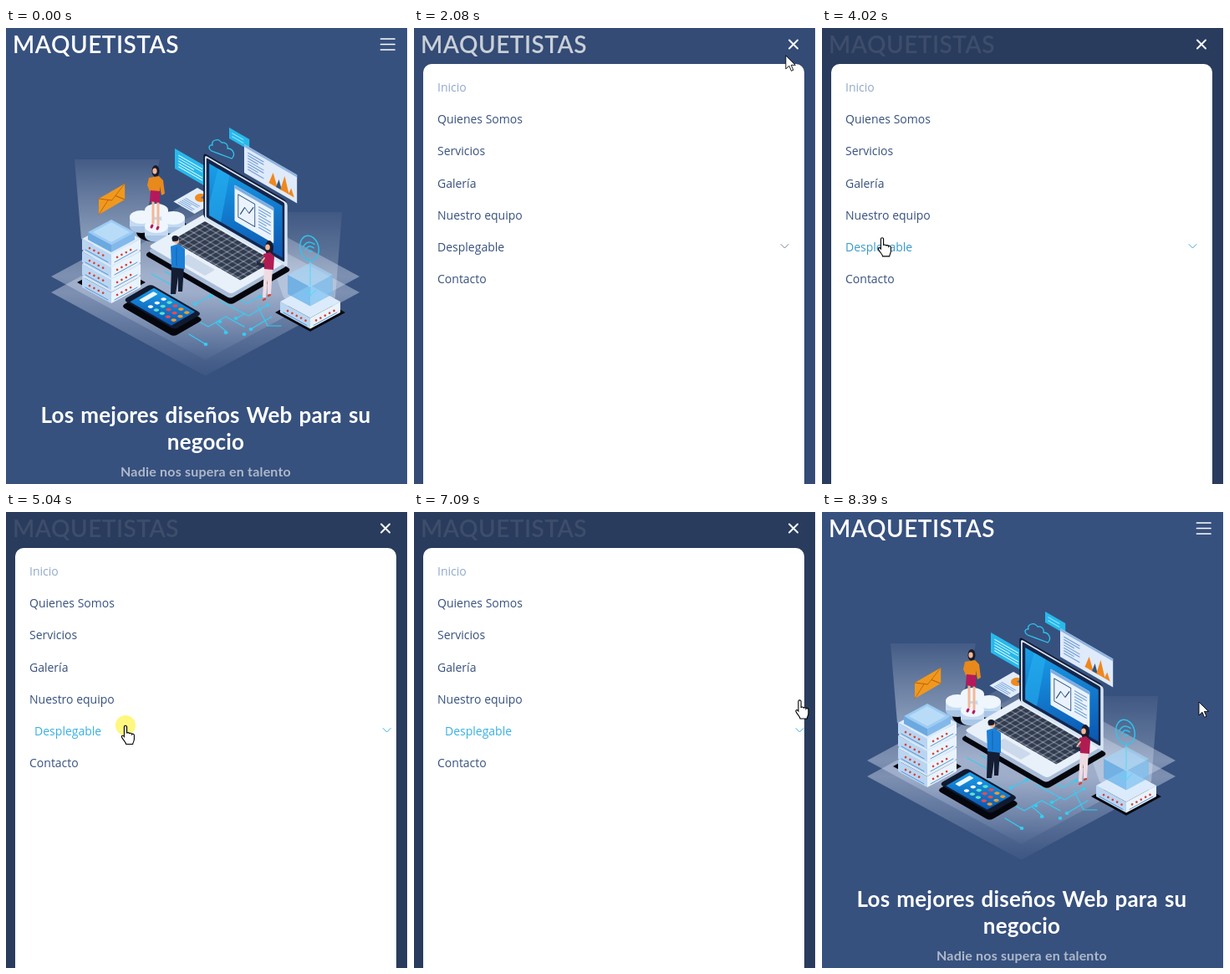
An HTML page for the animation above (8480 ms loop, 481x545 px).

```html
<!DOCTYPE html>
<html lang="es">
<head>
<meta charset="utf-8">
<title>Menú móvil</title>
<style>
  html, body { margin: 0; width: 100%; height: 100%; overflow: hidden; background: #fff; }
  svg { display: block; }
  .brand { font: 600 28px Lato, sans-serif; letter-spacing: .5px; fill: #fff; }
  .hero { font: 700 26px Lato, sans-serif; letter-spacing: .2px; word-spacing: 1.5px; fill: #fff; text-anchor: middle; }
  .lead { font: 700 16px Lato, sans-serif; letter-spacing: .2px; fill: #afb9cb; text-anchor: middle; }
  .menu { font: 14px "Open Sans", sans-serif; fill: #37517e; }
  .sub { font: 13px "Open Sans", sans-serif; fill: #0c3c53; }
  .card { fill: #fff; filter: drop-shadow(0 0 10px rgba(127, 137, 161, .28)); }
  .line { fill: none; stroke-linecap: round; stroke-linejoin: round; }
</style>
</head>
<body>
<svg width="481" height="545" viewBox="0 0 481 545">
  <defs>
    <linearGradient id="beam" x1="0" y1="0" x2="0" y2="1">
      <stop offset="0" stop-color="#fff" stop-opacity=".06"/>
      <stop offset="1" stop-color="#dcecff" stop-opacity=".55"/>
    </linearGradient>
    <linearGradient id="floor" x1="0" y1="0" x2="0" y2="1">
      <stop offset="0" stop-color="#fff" stop-opacity=".05"/>
      <stop offset=".5" stop-color="#dfe8fa" stop-opacity=".42"/>
      <stop offset="1" stop-color="#c8d4ee" stop-opacity=".04"/>
    </linearGradient>
    <linearGradient id="display" x1="0" y1="0" x2="1" y2="1">
      <stop offset="0" stop-color="#1aa0ea"/>
      <stop offset="1" stop-color="#0b55b0"/>
    </linearGradient>
    <pattern id="keys" width="7.6" height="7.6" patternUnits="userSpaceOnUse">
      <rect width="7.6" height="7.6" fill="#8d9bb2"/>
      <rect x=".5" y=".5" width="6.6" height="6.6" rx="1" fill="#333c4d"/>
    </pattern>
  </defs>

  <rect width="480" height="545" fill="#37517e"/>
  <g id="art"></g>
  <text class="hero" x="239" y="472">Los mejores diseños Web para su</text>
  <text class="hero" x="239" y="504">negocio</text>
  <text class="lead" x="239" y="536">Nadie nos supera en talento</text>
  <text class="brand" x="8" y="30">MAQUETISTAS</text>
  <path id="burger" class="line" d="M448.500 13H465M448.500 19.500H465M448.500 26H465" stroke="#fff" stroke-width="1.700"/>

  <rect id="shade" width="480" height="545" fill="#283a5a"/>
  <g id="nav">
    <path d="M449 14.500l10 10m0-10l-10 10" class="line" stroke="#fff" stroke-width="2"/>
    <rect x="11" y="43" width="456" height="530" rx="10" fill="#fff"/>
    <g id="items" class="menu"></g>
    <path id="chevron" class="line" d="M439 258.500l4.500 4.500 4.500-4.500"/>
    <g id="drop" class="sub"><rect class="card" x="29" y="290" width="420" height="166" rx="2"/></g>
  </g>

  <circle id="press" r="12" fill="#fff000" fill-opacity=".5"/>
  <path id="arrow" d="M0 0V16L4 12.300 6.600 18.400 9 17.300 6.400 11.400H11.500Z" fill="#fff" stroke="#000" stroke-width=".9"/>
  <path id="hand" d="M3 11V2.500a1.600 1.600 0 0 1 3.200 0V10c.3-1.300 2.900-1.200 3 .5c.5-1.200 2.800-1 2.900.7c.6-1 2.900-.7 2.900 1.200V17c0 2.500-1.500 3.500-1.700 6H5.200C5 20.500 2 18.500.2 14.800c-1-2 1.200-3 2.800-.8z" fill="#fff" stroke="#000" stroke-width="1.100"/>
</svg>

<script>
const $ = id => document.getElementById(id);

// ---- Illustration ----
const shape = (fill, d, extra = '') => `<path fill="${fill}" d="${d}" ${extra}/>`;
const line = (color, width, d, extra = '') =>
  `<path class="line" stroke="${color}" stroke-width="${width}" d="${d}" ${extra}/>`;
const rect = (fill, x, y, w, h, r = 0) =>
  `<rect fill="${fill}" x="${x}" y="${y}" width="${w}" height="${h}" rx="${r}"/>`;
const oval = (fill, x, y, rx, ry = rx) => `<ellipse fill="${fill}" cx="${x}" cy="${y}" rx="${rx}" ry="${ry}"/>`;
const plane = matrix => (x, y, body) => `<g transform="matrix(${matrix} ${x} ${y})">${body}</g>`;
const flat = plane('.866 .5 -.866 .5');
const wall = plane('.866 .5 0 1');
const wallUp = plane('.866 -.5 0 1');
const repeat = (n, draw) => Array.from({ length: n }, (_, i) => draw(i)).join('');

const diamond = (x, y, w, fill) => {
  const k = w * .54;
  return shape(fill, `M${x - w} ${y}l${w} ${-k} ${w} ${k} ${-w} ${k}z`);
};

function box(x, y, w, h, top, left, right) {
  const k = w * .54;
  return diamond(x, y, w, top) +
    shape(left, `M${x - w} ${y}l${w} ${k}v${h}l${-w} ${-k}z`) +
    shape(right, `M${x} ${y + k}l${w} ${-k}v${h}l${-w} ${k}z`);
}

function server(x, y, w) {
  const k = w * .54, dx = w - 14, dy = dx * .54;
  return box(x, y, w, 13, '#dcebfb', '#b9d5f2', '#e9f3fd') +
    line('#d8402f', 2.6, `M${x - w + 9} ${y + 11}l${dx} ${dy}`, 'stroke-dasharray=".1 6"') +
    line('#d8402f', 2.6, `M${x + 7} ${y + k + 3}l${dx} ${-dy}`, 'stroke-dasharray=".1 6"') +
    line('#5a95cf', 1, `M${x - w + 4} ${y + 13}l${w - 8} ${k - 4}M${x + 4} ${y + k + 9}l${w - 8} ${4 - k}`);
}

const pill = (x, y) => oval('#a9c6e6', x, y + 11, 14, 8) + rect('#c4daf2', x - 14, y, 28, 11) + oval('#eff6fe', x, y, 14, 8);

const textRows = (n, x, y, w, gap, color) =>
  repeat(n, i => rect(color, x, y + i * gap, w * (i % 3 == 2 ? .65 : 1), 1.2));

const backdrop =
  diamond(238.5, 316, 184.5, 'url(#floor)') + diamond(238.5, 297, 184.5, 'url(#floor)') +
  shape('url(#beam)', 'M82 157H184L161 252 126 271 90 252Z') +
  shape('url(#beam)', 'M296 220H402L394 322 364 340 332 322Z', 'opacity=".75"');

const circuits =
  line('#35cdf2', 1.2, 'M174 294l24 13v14l18 10M190 291l22 12M219 366l20 12M226 330l19-10h20l14-9' +
    'M222 346l20 11 21-12 22 12M251 352l14 12M256 326l34 18 23-13M270 319l18 10 16-8M276 347l10-6M318 345l-25 15M301 332l12 24h16') +
  [[239, 378], [256, 351], [263, 364], [285, 366], [293, 360], [275, 347], [226, 330], [304, 321], [313, 331], [245, 320]]
    .map(([x, y]) => oval('#35cdf2', x, y, 2.4, 1.9)).join('');

const rack =
  diamond(126, 304, 41, '#05070d') +
  repeat(4, i => server(126, 297 - i * 15, 35)) +
  box(126, 244, 28, 9, '#9ccbf3', '#6ba9e0', '#82b9ea') + diamond(126, 244, 22, '#b8dcf8');

const envelope = wallUp(111, 204,
  rect('#f0981e', 0, 0, 36, 19) + line('#b86408', 1, 'M0 0L18 11 36 0M0 19L13 8M36 19L23 8'));

const coins = oval('#05070d', 181, 244, 25, 12) + oval('#05070d', 204, 238, 13, 8) +
  pill(180, 218) + pill(162, 226) + pill(200, 227) + pill(180, 237);

const presenter =
  oval('#191b2b', 179, 171, 4.5, 7) + oval('#f4b898', 178, 171, 2.6, 3.4) +
  line('#f4b898', 3, 'M176 206V233M182 206V235') +
  shape('#e8891c', 'M171 179L183 177 188 182 190 198 186 200 184 189V197L172 195 169 188Z') +
  shape('#b5195c', 'M173 194L184 195V209L172 207Z') +
  line('#b5195c', 3, 'M175 236l-1 2M182 238l-1 2');

const laptop =
  flat(238, 231, rect('#05070d', -2, -2, 120, 84, 5)) +
  flat(238, 227, rect('#a9bdd8', 0, 0, 114, 79, 4)) +
  flat(238, 222, rect('#e8f0fa', 0, 0, 114, 78, 4) + rect('url(#keys)', 9, 9, 95, 46, 1) + rect('#cbd9ea', 37, 60, 37, 14, 1)) +
  wall(238, 152,
    rect('#101a33', -2, -2, 115, 77, 4) + rect('#d7e4f4', 0, 0, 114, 77, 3) +
    rect('#14264a', 2, 2, 108, 71, 2) + rect('url(#display)', 6, 7, 101, 62) +
    shape('#27b2f2', 'M18 7H34L22 69H6V55Z', 'opacity=".55"') +
    rect('#eaf3fd', 41, 15, 54, 43, 1) + rect('#7faee0', 41, 15, 54, 4) +
    line('#274a78', 1, 'M46 24h23v27h-23zM49 46l6-11 6 4 6-10') + textRows(8, 74, 24, 17, 3.5, '#6f9fd6'));

const cards =
  wall(202, 144, rect('#27b9ec', 0, 0, 51, 24) + textRows(5, 5, 5, 33, 3.4, '#d8f6ff')) +
  wall(267, 119, rect('#27b9ec', 0, 0, 28, 13) + textRows(2, 4, 4, 16, 4, '#8fe6fb')) +
  wall(285, 139, rect('#dfeafa', 0, 0, 73, 34) + rect('#8eb4e2', 0, 0, 73, 3) +
    textRows(7, 5, 7, 22, 3.3, '#6b9ad3') +
    shape('#f0871c', 'M34 29L40 14 46 29Z') + shape('#30567f', 'M44 29L48 18 52 29Z') +
    shape('#f0871c', 'M50 29L56 10 62 29Z') + shape('#f0871c', 'M61 29L65 20 69 29Z')) +
  flat(229, 191, rect('#e2edfa', 0, 0, 29, 33) + textRows(5, 4, 20, 20, 2.5, '#7ba8da')) +
  oval('#f08a1e', 233, 203, 7, 5) + shape('#2b75b9', 'M233 203L238 199.500A7 5 0 0 1 239 205Z') +
  line('#2ec5f0', 1.3, 'M246 147c-5-3-3-8 1-7c-2-6 7-9 11-3c5-1 8 3 7 7c7 0 10 8 5 12z');

const visitor =
  oval('#f4b898', 204, 254, 3, 4) + oval('#151a2c', 202.5, 251.5, 4, 3.6) +
  shape('#151d33', 'M198 285H213L211 315H206V297L203 318H197Z') +
  shape('#1b7fd6', 'M197 261L206 258 214 264V288L198 286Z') + line('#1262b0', 1, 'M204 262V284');

const assistant =
  oval('#191b2b', 315, 263, 5, 9) + oval('#f4b898', 313, 262, 2.8, 3.6) +
  shape('#efdce3', 'M309 286H319L317 318H313V301L311 322H307Z') +
  shape('#b01c52', 'M308 270L316 268 321 273 320 289 309 288Z') +
  line('#f4b898', 2, 'M309 275l-5 7') + shape('#1d2b4a', 'M300 279l9 3v4l-9-3z') +
  line('#d8402f', 2.4, 'M308 325l2-1M314 320l2-1');

const dots = ['#fff', '#f29b27', '#e84c4c', '#5fe0c5'];
const phone =
  flat(173, 313, rect('#05070d', -1, -1, 73, 41, 5)) +
  flat(173, 306, rect('#101a30', 0, 0, 71, 38, 5) + rect('url(#display)', 7, 2.5, 57, 33, 1) +
    repeat(15, i => oval(dots[(i * 7 + (i >> 2)) % 4], 27 + (i % 5) * 8, 9 + (i / 5 | 0) * 9, 2.5)) +
    rect('#eaf6ff', 11, 7, 6, 20, 1));

const relay =
  diamond(364, 340, 42, '#05070d') + server(364, 327, 36) +
  `<g opacity=".62">${box(364, 295, 27, 23, '#a6d8fa', '#4ba6e9', '#6fbcf0')}</g>` +
  line('#54d7f5', 1, 'M364 278V320M357 313l7 7 7-7') +
  `<g transform="rotate(-14 363 263)">` +
  line('#2ec5f0', 1.5, 'M352 263a11 15 0 1 0 22 0a11 15 0 1 0-22 0M356 260q7-8 14 0M358 264q5-6 10 0M361 268q2-3 4 0') + '</g>';

$('art').innerHTML = [backdrop, circuits, rack, envelope, coins, cards, presenter, laptop, visitor, assistant, phone, relay].join('');

// ---- Menu ----
const ROW = 38.2, FOLD = 5;
const labels = ['Inicio', 'Quienes Somos', 'Servicios', 'Galería', 'Nuestro equipo', 'Desplegable', 'Contacto'];
$('items').innerHTML = labels.map((label, i) => `<text x="28" y="${Math.round(76 + i * ROW)}">${label}</text>`).join('');
$('drop').innerHTML += repeat(4, i => `<text x="46" y="${321 + i * 37}">Desplegable ${i + 1}</text>`);
const items = [...$('items').children];
items[0].style.fill = '#92a8cc';

// ---- Timeline: time, x, y of the pointer tip ----
const LOOP = 8480;
const path = [
  [140, 426, 541], [380, 418, 533], [530, 417, 525], [800, 442, 350], [1050, 469, 150], [1310, 466, 34],
  [1620, 452, 19], [2000, 452, 19], [2250, 430, 62], [2550, 320, 96], [2800, 228, 122], [2930, 170, 145],
  [3000, 110, 159], [3100, 78, 168], [3400, 74, 205], [3710, 72, 243], [4090, 72, 252], [4260, 72, 253],
  [4650, 148, 255], [4810, 143, 255], [5120, 143, 255], [5400, 260, 264], [5740, 392, 278], [5900, 428, 279],
  [6060, 447, 271], [6310, 453, 264], [6600, 458, 259], [6990, 458, 259], [7250, 467, 170], [7500, 462, 50],
  [7700, 455, 14], [8250, 455, 14], [8320, 454, 120], [8390, 451, 227],
];
const presses = [[1850, 2000], [4960, 5120], [6700, 6840], [8100, 8260]];

const within = (t, [from, to]) => t >= from && t < to;
const ramp = (t, from, to) => Math.min(1, Math.max(0, (t - from) / (to - from)));
const mix = (a, b, k) => a + (b - a) * k;
const blend = (top, base, k) => `color-mix(in srgb, ${top} ${k * 100}%, ${base})`;
const show = (id, on) => $(id).style.display = on ? '' : 'none';
const place = (id, x, y) => $(id).setAttribute('transform', `translate(${x} ${y})`);

function pointer(t) {
  const i = path.findIndex(p => p[0] > t);
  if (i < 1) return path[i ? path.length - 1 : 0].slice(1);
  const [a, b] = [path[i - 1], path[i]];
  const k = ramp(t, a[0], b[0]);
  return [mix(a[1], b[1], k), mix(a[2], b[2], k)];
}

const rowAt = t => Math.floor((pointer(t)[1] - 51.5) / ROW);
const hover = (t, row) => [60, 90, 120, 150].filter(lag => rowAt(t - lag) == row).length / 4;

function render(t) {
  const menuOpen = within(t, [2000, 8260]);
  const dropOpen = within(t, [5120, 6840]);
  show('burger', !menuOpen);
  show('nav', menuOpen);
  show('shade', menuOpen);
  show('drop', dropOpen);
  $('shade').style.opacity = .9 * ramp(t, 2000, 2300);

  for (let i = 1; i < FOLD; i++) items[i].style.fill = blend('#47b2e4', '#37517e', hover(t, i));
  items[6].setAttribute('y', dropOpen ? 489 : 305);

  const leave = ramp(t, 7090, 7260);
  const lit = ramp(t, 3790, 4090);
  const shift = 9 * ramp(t, 4960, 5080) - 6.5 * leave;
  items[FOLD].style.fill = leave ? blend('#6f80a8', '#38b0e2', leave) : blend('#38b0e2', '#37517e', lit);
  $('chevron').style.stroke = leave ? blend('#8d9ab5', '#38b0e2', leave) : blend('#38b0e2', '#71829f', lit);
  place('chevron', shift * 2, 0);
  items[FOLD].setAttribute('x', 28 + shift);

  const [x, y] = pointer(t);
  const hand = within(t, [1460, 8260]) && !(y > 30 && y < 52);
  show('hand', hand);
  show('arrow', !hand && t >= 140);
  show('press', presses.some(span => within(t, span)));
  place('hand', x - 4.6, y - .5);
  place('arrow', x, y);
  place('press', x, y);
}

const start = performance.now();
function tick() {
  render((performance.now() - start) % LOOP);
  requestAnimationFrame(tick);
}
tick();
</script>
</body>
</html>
```
